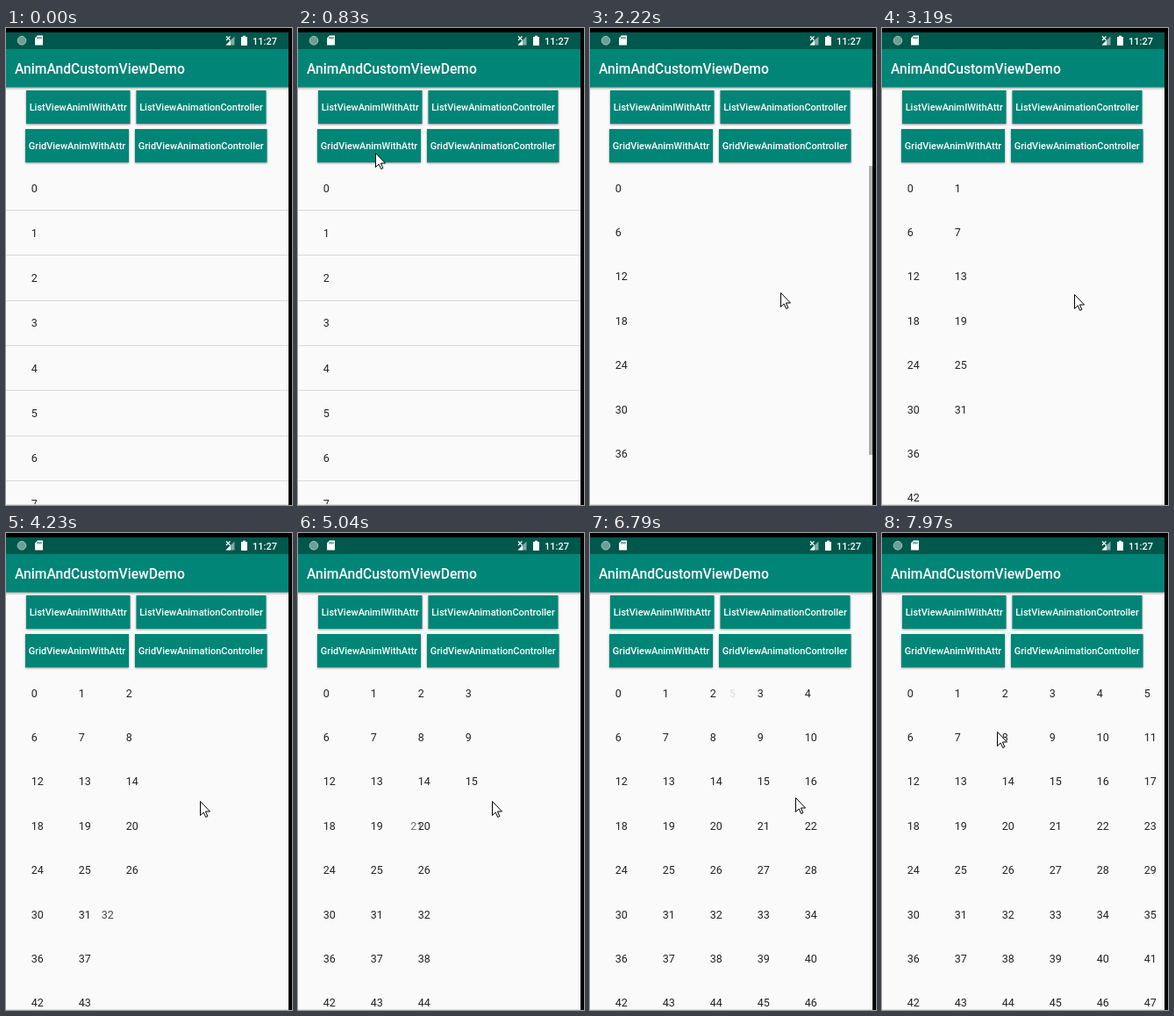
An HTML page that plays this animation: 326 by 543 pixels, repeating every 8000 ms.

```html
<!DOCTYPE html>
<html lang="en">
<head>
<meta charset="utf-8">
<title>Grid animation demo</title>
<style>
  html, body { margin: 0; width: 100%; height: 100%; overflow: hidden; background: #000; }
  svg { display: block; width: 326px; height: 543px; font-family: Roboto, sans-serif; }
  .item { font-size: 12.5px; fill: #212121; }
  .bold { font-weight: 500; fill: #fff; }
  .button rect { fill: #008577; filter: drop-shadow(0 1px 1px rgba(0, 0, 0, .4)); }
  .button text { font-size: 10.97px; text-anchor: middle; }
</style>
</head>
<body>
<svg viewBox="0 0 326 543">
  <defs>
    <linearGradient id="shade" x2="0" y2="1">
      <stop stop-opacity=".3"/>
      <stop offset="1" stop-opacity="0"/>
    </linearGradient>
  </defs>
  <rect width="326" height="543"/>
  <rect y="5" width="322" height="538" fill="#fafafa"/>
  <g id="list"></g>
  <g id="grid"></g>
  <rect y="542" width="322" height="1" fill="#dedede"/>
  <rect id="bar" x="318" y="157" width="4" height="329" fill="#b0b0b0"/>
  <rect x="322" width="4" height="543"/>

  <rect y="67" width="322" height="4" fill="url(#shade)"/>
  <rect y="24" width="322" height="43.5" fill="#008577"/>
  <rect y="5" width="322" height="19" fill="#00574b"/>
  <text class="bold" x="10" y="52" font-size="15.67">AnimAndCustomViewDemo</text>
  <text class="bold" x="281" y="18.5" font-size="11">11:27</text>
  <circle cx="18" cy="14.3" r="4.8" fill="#6d9f97" stroke="#a5c4bf"/>
  <path d="M36 8.5h6v11h-9v-8z" fill="#fff"/>
  <path d="M36 10v2.5M38 10v2.5M40 10v2.5" stroke="#00574b"/>
  <path d="M260.500 9.500v10h-10z" fill="#7faba5"/>
  <path d="M256 14v5.500h-5.500z" fill="#fff"/>
  <path d="M251 9.500l4.500 4.500m0-4.500l-4.500 4.500" stroke="#fff" stroke-width="1.200"/>
  <path d="M268 10h2v-1.200h3v1.200h2v10h-7z" fill="#fff"/>
  <g id="buttons"></g>
  <path id="cursor" d="M.5.5V16.500L4.200 13 6.700 18.500 8.900 17.500 6.400 12H11.500Z" fill="#fff" stroke="#000"/>
</svg>
<script>
const LOOP = 8000, ROWS = 8, COLS = 6;
const GRID_START = 1151, DELAY = 140.5, DURATION = 154, SLIDE = 161;
const $ = id => document.getElementById(id);

function add(parent, tag, attrs, text = "") {
  const el = document.createElementNS("http://www.w3.org/2000/svg", tag);
  for (const name in attrs) el.setAttribute(name, attrs[name]);
  el.textContent = text;
  return parent.appendChild(el);
}

for (const [label, x, y, width] of [
  ["ListViewAnimIWithAttr", 23, 71, 118.5],
  ["ListViewAnimationController", 148.5, 71, 148],
  ["GridViewAnimWithAttr", 22, 115, 118],
  ["GridViewAnimationController", 147, 115, 150.5]
]) {
  const g = add($("buttons"), "g", { class: "button" });
  add(g, "rect", { x, y, width, height: 38 });
  add(g, "text", { class: "bold", x: x + width / 2, y: y + 23.3 }, label);
}

for (let i = 0; i < 8; i++) {
  add($("list"), "text", { class: "item", x: 28.8, y: 186.5 + 51.3 * i }, i);
  add($("list"), "rect", { y: Math.round(207 + 51.3 * i), width: 322, height: 1, fill: "#d9d9d9" });
}

// Cells enter one after another, column by column.
const cells = [];
for (let col = 0; col < COLS; col++)
  for (let row = 0; row < ROWS; row++)
    cells.push(add($("grid"), "text",
      { class: "item", x: 28.8 + 54 * col, y: 186.5 + 50.4 * row }, row * COLS + col));

const clamp = v => Math.min(1, Math.max(0, v));

// time, x, y of the pointer tip
const path = [
  [490, 282, 246], [890, 76, 135], [1130, 76, 135], [1360, 211, 296],
  [1930, 217, 301], [2810, 217, 301], [3590, 221, 305], [5270, 221, 305],
  [5560, 234, 301], [7690, 234, 301], [7970, 131, 226]
];

function pointerAt(t) {
  const i = path.findIndex(p => p[0] > t);
  if (i < 0) return path[path.length - 1].slice(1);
  const [a, b] = [path[Math.max(0, i - 1)], path[i]];
  const u = clamp((t - a[0]) / (b[0] - a[0] || 1));
  const e = u * u * (3 - 2 * u);
  return [1, 2].map(k => a[k] + (b[k] - a[k]) * e);
}

// The screen refreshes in steps of about 58 ms between these marks.
const marks = [490, 1130, 1990, 2810, 3650, 4460, 5270, 6090, 6910, 7730, 8030];

function refreshTime(t) {
  if (t < marks[0]) return 0;
  const i = marks.findIndex(m => m > t);
  const start = marks[i - 1], span = marks[i] - start;
  const step = span / Math.round(span / 58.5);
  return Math.min(t, start + Math.floor((t - start + 10) / step) * step);
}

function draw(time) {
  const t = refreshTime(time);
  const listed = t < 1130;
  $("list").style.display = listed ? "" : "none";
  $("bar").style.opacity = listed ? 0 : 1 - clamp((t - 2640) / 300);
  cells.forEach((cell, i) => {
    const p = clamp((t - GRID_START - i * DELAY) / DURATION);
    cell.style.opacity = p;
    cell.setAttribute("transform", `translate(${SLIDE * (p - 1)})`);
  });
  $("cursor").style.display = t < 490 ? "none" : "";
  $("cursor").setAttribute("transform", `translate(${pointerAt(t).map(Math.round)})`);
}

const began = performance.now();
function frame() {
  draw((performance.now() - began) % LOOP);
  requestAnimationFrame(frame);
}
frame();
</script>
</body>
</html>
```
